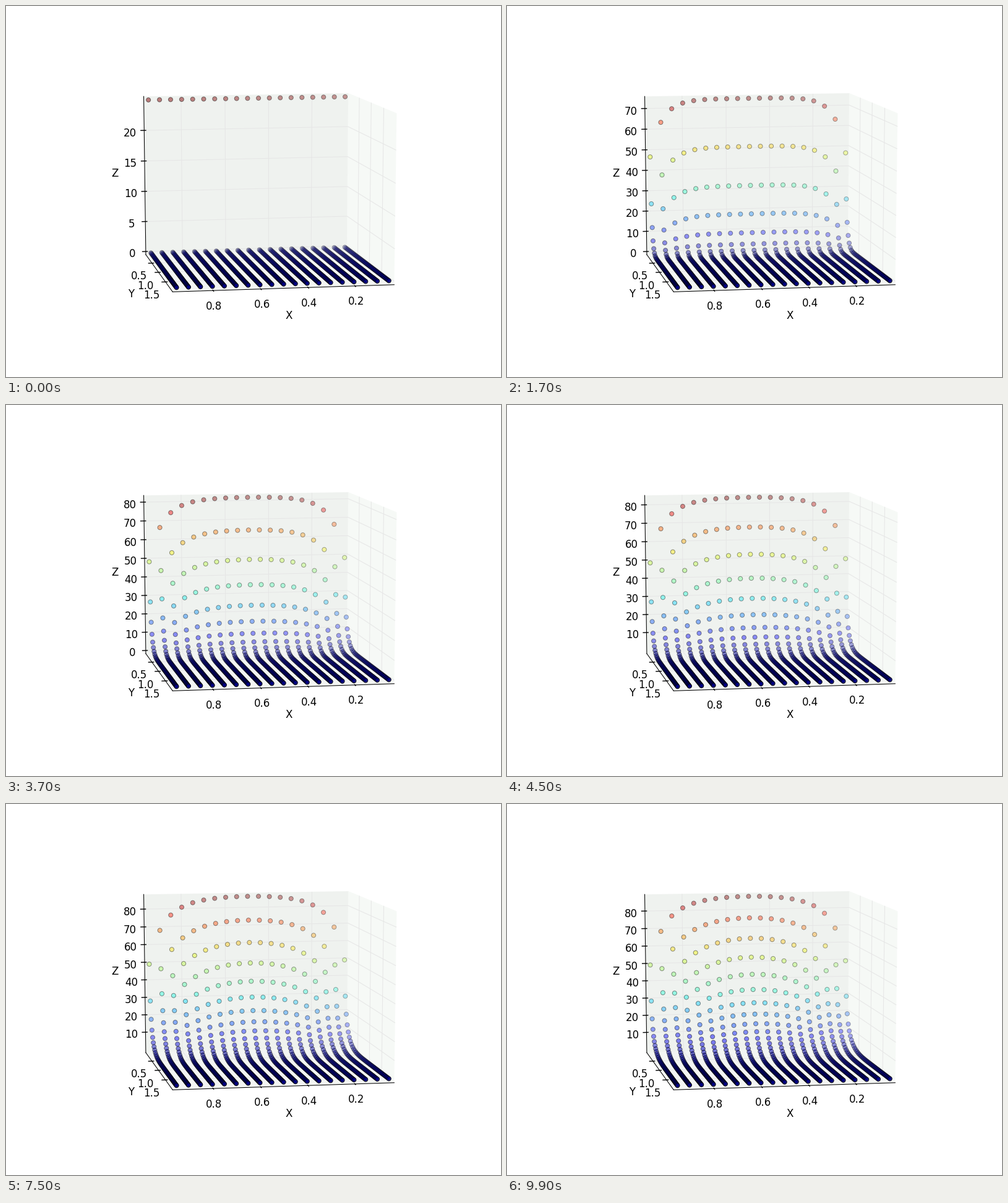
A matplotlib script for the animation above (10000 ms loop, 800x600 px).

```python
import numpy as np
import matplotlib.pyplot as plt
from matplotlib.animation import FuncAnimation
from matplotlib.collections import LineCollection
from matplotlib.patches import Polygon
from matplotlib.textpath import TextPath

plt.rcParams["font.family"] = "DejaVu Sans"

FRAMES = 100
DPI = 100
HAIRLINE = 72 / DPI               # one pixel in points
FONT = 12
CAP = 12                          # cap height in pixels
DIST = 10
ELEV, AZIM = np.radians([10, 80])
PAD = 1 / 48                      # the box reaches a little past the data
LOW, HIGH = -PAD, 1 + PAD
DELTA = 1 / 12
VIEW = (-0.095, 0.09)
PIXEL = (VIEW[1] - VIEW[0]) / np.array([620, 480])

# Per axis: fixed coordinates of its edge, tick direction
EDGES = [((0, HIGH, LOW), 1), ((HIGH, 0, LOW), 0), ((HIGH, LOW, 0), 0)]
PANES = [(0.935, 0.955, 0.935, 0.5),
         (0.882, 0.906, 0.882, 0.5),
         (0.914, 0.93, 0.914, 0.5)]


def project(points):
    """Perspective view of the unit cube: screen x, y and distance."""
    p = np.asarray(points, float) - 0.5
    ce, se = np.cos(ELEV), np.sin(ELEV)
    ca, sa = np.cos(AZIM), np.sin(AZIM)
    depth = DIST - p @ [ca * ce, sa * ce, se]
    sx = p @ [-sa, ca, 0] / depth
    sy = p @ [-ca * se, -sa * se, ce] / depth
    return np.column_stack([sx, sy]), depth


def edge_point(axis, t):
    p = np.array(EDGES[axis][0], float)
    p[axis] = t
    return p


def label_spot(axis, t, space):
    p = edge_point(axis, t)
    shift = np.sign(p - 0.5) * space * DELTA
    shift[axis] = 0
    return project([p + shift])[0][0]


def tick_segment(axis, t):
    ends = np.array([edge_point(axis, t)] * 2)
    ends[:, EDGES[axis][1]] += np.array([-0.1, 0.2]) * DELTA
    return project(ends)[0]


def grid_line(axis, t):
    pts = np.full((3, 3), LOW)
    pts[:, axis] = t
    pts[0, (axis + 1) % 3] = HIGH
    pts[2, (axis + 2) % 3] = HIGH
    return project(pts)[0]


def heat_states():
    """Explicit heat flow on a 1 x 2 plate with one hot edge."""
    u = np.zeros((41, 21))
    u[0] = 100
    states = []
    for _ in range(FRAMES):
        u[1:-1, 1:-1] = 0.25 * (u[:-2, 1:-1] + u[2:, 1:-1]
                                + u[1:-1, :-2] + u[1:-1, 2:])
        states.append(u[1:-1, 1:-1].ravel().copy())
    return states


fig = plt.figure(figsize=(8, 6), dpi=DPI, facecolor="white")
ax = fig.add_axes([0.125, 0.1, 0.775, 0.8])
ax.axis("off")

for axis, color in enumerate(PANES):
    square = np.array([(LOW, LOW), (HIGH, LOW), (HIGH, HIGH), (LOW, HIGH)])
    corners = np.insert(square, axis, LOW, axis=1)
    ax.add_patch(Polygon(project(corners)[0], fc=color, ec="none",
                         zorder=1, clip_on=False))


def add_lines(color, width, zorder, cap):
    lines = LineCollection([], colors=[color], linewidths=width,
                           capstyle=cap, zorder=zorder, clip_on=False)
    return ax.add_collection(lines, autolim=False)


def add_text():
    return ax.text(0, 0, "", size=FONT, ha="center", va="baseline", zorder=4)


def place(label, text, spot, drop):
    """Centre the ink on the spot, its baseline drop pixels below."""
    ink = TextPath((0, 0), text, size=FONT * DPI / 72).get_extents()
    label.set_text(text)
    label.set_position(spot - np.array([ink.x0 + 0.5, drop - 0.5]) * PIXEL)


grids = [add_lines("0.9", HAIRLINE, 2, "butt") for _ in range(3)]
ticks = [add_lines("black", 1, 3, "projecting") for _ in range(3)]
labels = [[add_text() for _ in range(n)] for n in (4, 3, 10)]


def set_ticks(axis, values, lo, hi, form):
    places = [(v - lo) / (hi - lo) for v in values]
    grids[axis].set_segments([grid_line(axis, t) for t in places])
    ticks[axis].set_segments([tick_segment(axis, t) for t in places])
    for label in labels[axis]:
        label.set_visible(False)
    for label, value, t in zip(labels[axis], values, places):
        place(label, form % value, label_spot(axis, t, 0.7), CAP)
        label.set_visible(True)


for axis, name in enumerate("XYZ"):
    ends = project([edge_point(axis, LOW), edge_point(axis, HIGH)])[0]
    ax.plot(*ends.T, color="black", lw=0.75, zorder=3, clip_on=False)
    place(add_text(), name, label_spot(axis, 0.5, 1.6), CAP / 2)

set_ticks(0, [0.2, 0.4, 0.6, 0.8], 0.05, 0.95, "%.1f")
set_ticks(1, [0.5, 1.0, 1.5], 0.05, 1.95, "%.1f")

STATES = heat_states()
gy, gx = np.meshgrid(np.linspace(0, 1, 39), np.linspace(0, 1, 19),
                     indexing="ij")
gx, gy = gx.ravel(), gy.ravel()
# Each disc covers 20 square points
dots = ax.scatter(gx, gy, s=20 * 4 / np.pi, linewidths=HAIRLINE, zorder=5,
                  clip_on=False)
ax.set(xlim=VIEW, ylim=VIEW)


def update(i):
    heat = STATES[i]
    lo, hi = heat.min(), heat.max()
    step = 5 if hi <= 45 else 10
    set_ticks(2, [v for v in range(0, 100, step) if lo <= v < hi],
              lo, hi, "%d")

    level = (heat - lo) / (hi - lo)
    spots, depth = project(np.column_stack([gx, gy, level]))
    far = -1 / depth
    alpha = 1 - 0.7 * (far - far.min()) / np.ptp(far)
    faces = plt.cm.jet(level)
    faces[:, 3] = alpha
    rims = np.zeros_like(faces)
    rims[:, 3] = alpha
    dots.set_offsets(spots)
    dots.set_facecolors(faces)
    dots.set_edgecolors(rims)
    return [dots]


anim = FuncAnimation(fig, update, frames=FRAMES, interval=100,
                     repeat=True, repeat_delay=0, blit=False)
plt.show()
```
